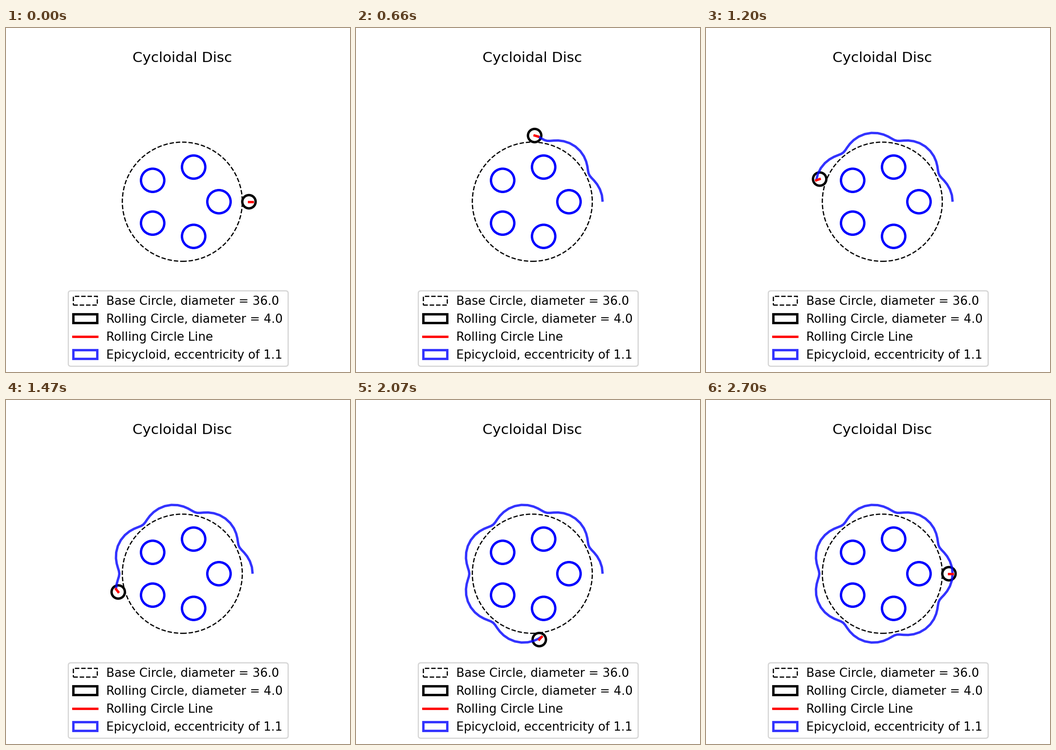
Write a matplotlib script that moves like this. It is 748 by 748 pixels and loops after 2730 ms.

```python
import numpy as np
import matplotlib.pyplot as plt
from matplotlib.animation import FuncAnimation
from matplotlib.patches import Circle, Polygon

FRAMES = 91
INTERVAL = 30

BASE_R = 18.0
ROLL_R = 2.0
ECC = 1.1
LOBES = 7
HOLES = 5
HOLE_R = 3.5
HOLE_ORBIT = 11.0


def polar(radius, angle):
    return np.column_stack([radius * np.cos(angle), radius * np.sin(angle)])


theta = np.linspace(0, 2 * np.pi, FRAMES)
centers = polar(BASE_R + ROLL_R, theta)
tips = centers + polar(ECC, (LOBES + 1) * theta)

fig, ax = plt.subplots(figsize=(4, 4), dpi=187)
ax.set_xlim(-40, 40)
ax.set_ylim(-40, 40)
ax.axis("off")
ax.set_title("Cycloidal Disc")


def ring(center, radius, **style):
    return ax.add_patch(Circle(center, radius, fill=False, **style))


for hole in polar(HOLE_ORBIT, 2 * np.pi * np.arange(HOLES) / HOLES):
    ring(hole, HOLE_R, ec="blue", lw=2)

base = ring((0, 0), BASE_R, ec="black", lw=1, ls="--")
roller = ring(centers[0], ROLL_R, ec="black", lw=2)
arm, = ax.plot([], [], color="red", lw=2)
curve = ax.add_patch(Polygon(tips[:1], closed=False, fill=False,
                             ec="blue", lw=2, alpha=0.8))

fig.legend(
    [base, roller, arm, curve],
    [f"Base Circle, diameter = {2 * BASE_R}",
     f"Rolling Circle, diameter = {2 * ROLL_R}",
     "Rolling Circle Line",
     f"Epicycloid, eccentricity of {ECC}"],
    loc="lower center",
)


def update(i):
    roller.center = centers[i]
    arm.set_data(*np.array([centers[i], tips[i]]).T)
    curve.set_xy(tips[:i + 1])
    return roller, arm, curve


anim = FuncAnimation(fig, update, frames=FRAMES, interval=INTERVAL,
                     repeat=True, repeat_delay=0)
plt.show()
```
